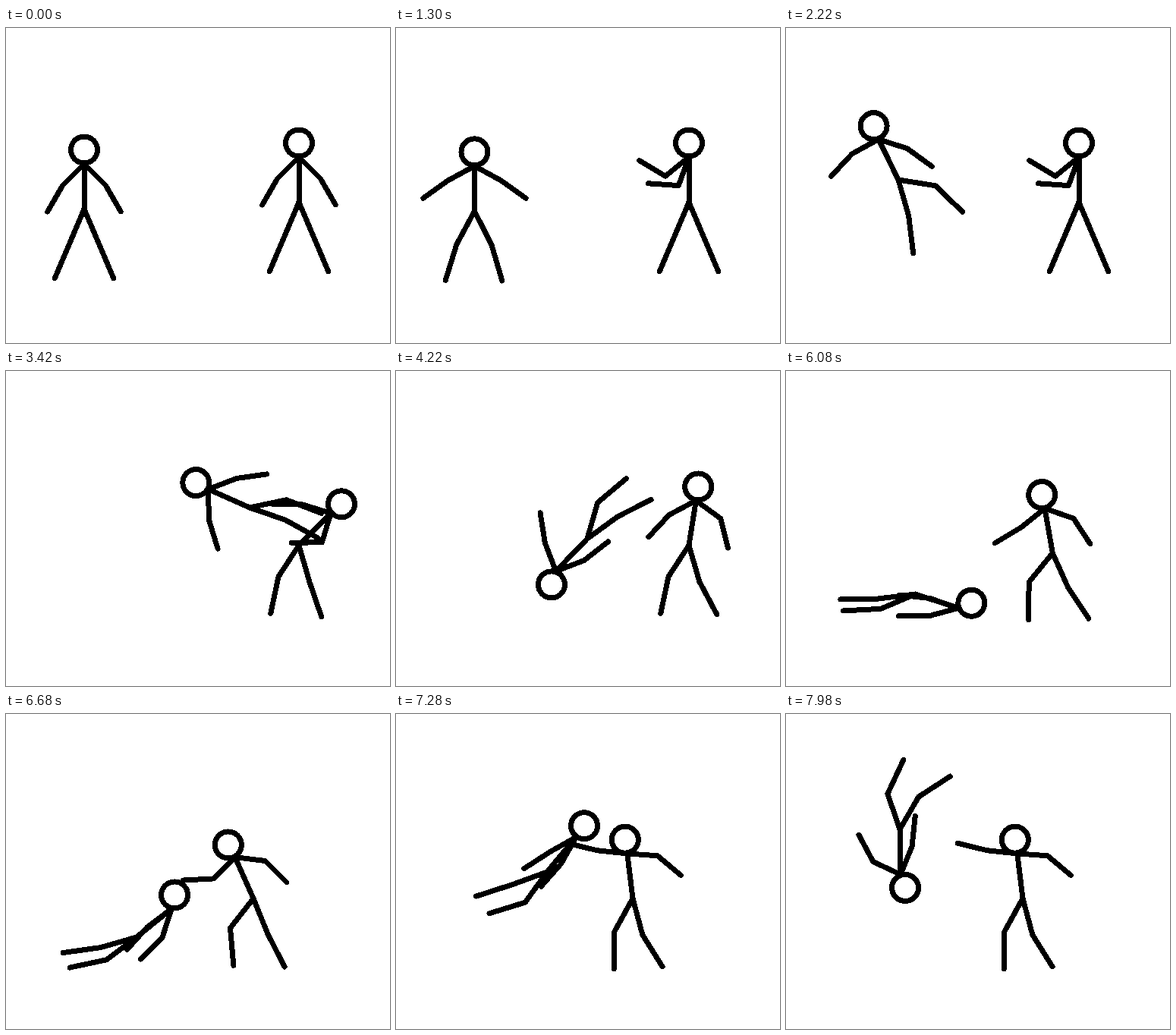
An HTML page that plays this animation: 506x415 px, repeating every 8 s.

```html
<!DOCTYPE html>
<html lang="en">
<head>
<meta charset="utf-8">
<title>Stick fight</title>
<style>
  html, body { margin: 0; width: 100%; height: 100%; overflow: hidden; background: #fff; }
  svg { display: block; width: 506px; height: 415px; }
  path { fill: none; stroke: #000; stroke-width: 7; stroke-linecap: round; stroke-linejoin: round; shape-rendering: crispEdges; }
</style>
</head>
<body>
<svg viewBox="0 0 506 415"><path id="attacker"/><path id="defender"/></svg>
<script>
const LOOP = 8000;
const TORSO = 59.5, NECK = 18.5, ARM = 40, LEG = 49.5, HEAD = 17.5;

// Angles are absolute degrees: 0 points right, 90 down. Spine is [torso, head], limbs are [upper, lower].
const stand = (x, y) => ({
  hip: [x, y], spine: [-90, -90],
  armA: [135, 120], armB: [45, 60],
  legA: [113, 113], legB: [67, 67]
});

// A move goes from wherever the figure is to the pose; bow bends the path of the hip on the way.
const attacker = {
  path: document.getElementById("attacker"),
  start: stand(103, 238.5),
  moves: [
    { // crouch with the arms spread
      from: 9, to: 18, hip: [104, 245], armA: [172, 175], armB: [8, 5], legA: [125, 100], legB: [58, 82]
    },
    { // leave the ground
      from: 18, to: 23, hip: [148, 200], spine: [-116, -110],
      armA: [151, 133], armB: [18, 36], legA: [74, 83], legB: [9, 44]
    },
    { // flying kick
      from: 23, to: 35, bow: [0, -17], hip: [321, 180], spine: [-156, -152],
      armA: [89, 73], armB: [-21, -8], legA: [19, 29], legB: [-12, 21]
    },
    { // tumble backwards
      from: 36, to: 43, hip: [252, 221], spine: [-226, -252],
      armA: [-21, -38], armB: [-111, -99], legA: [-36, -27], legB: [-74, -40]
    },
    { // roll flat
      from: 43, to: 54, bow: [0, -22], hip: [170.5, 294], spine: [-342, -381],
      armA: [-161, -174], armB: [-195, -180], legA: [-187, -181], legB: [-203, -183]
    },
    { // pulled up by the head
      from: 63, to: 69, hip: [172, 294], spine: [-399, -438],
      armA: [-217, -228], armB: [-252, -225], legA: [-196, -188], legB: [-217, -192]
    },
    { // held upright
      from: 69, to: 73, hip: [238, 224], spine: [-450, -450],
      armA: [-225, -240], armB: [-290, -270], legA: [-240, -245], legB: [-270, -235]
    },
    { // flipped over
      from: 73, to: 82, bow: [-30, 0], hip: [150, 152], spine: [-271, -289],
      armA: [-155, -118], armB: [-68, -84], legA: [-60, -33], legB: [-109, -65]
    }
  ]
};

const defender = {
  path: document.getElementById("defender"),
  start: stand(386, 229.5),
  moves: [
    { from: 0, to: 9, armA: [141, 211], armB: [110, 184] }, // guard
    { from: 23, to: 27, legA: [123, 102], legB: [74, 71] }, // brace
    { from: 31, to: 35, spine: [-45, -41], armA: [197, 181], armB: [107, 179] }, // recoil
    { from: 36, to: 43, spine: [-81, -81], armA: [152, 133], armB: [36, 76], legB: [74, 62] }, // recover
    { // step forward
      from: 54, to: 56, hip: [373, 237], spine: [-88, -87],
      armA: [147, 125], armB: [29, 67], legA: [130, 95], legB: [64, 51]
    },
    { // walk in and grab
      from: 56, to: 69, hip: [326, 243], spine: [-114, -119],
      armA: [135, 177], armB: [7, 45], legA: [128, 85], legB: [68, 63]
    },
    { // lift and throw
      from: 69, to: 73, hip: [312, 243], spine: [-97, -99],
      armA: [186, 194], armB: [4, 40], legA: [119, 91], legB: [75, 58]
    }
  ]
};

// Sections of 100 ms steps: [start time, first step]
const sections = [[0, 0], [1820, 19], [5460, 56], [6180, 64]];

function stepAt(time) {
  const [start, first] = sections.filter(([begin]) => time >= begin).pop();
  return first + Math.floor((time - start) / 100);
}

const mix = (a, b, k) => a.map((v, i) => v + (b[i] - v) * k);

function poseAt({ start, moves }, step) {
  const pose = { ...start };
  for (const { from, to, bow = [0, 0], ...goal } of moves) {
    if (step <= from) break;
    const k = Math.min(1, (step - from) / (to - from));
    for (const part in goal) pose[part] = mix(pose[part], goal[part], k);
    pose.hip = pose.hip.map((v, i) => v + bow[i] * Math.sin(Math.PI * k));
  }
  return pose;
}

function reach([x, y], angle, length) {
  const r = angle * Math.PI / 180;
  return [x + Math.cos(r) * length, y + Math.sin(r) * length];
}

const line = points => "M" + points.map(p => p.map(v => v.toFixed(2)).join()).join("L");

function limb(root, [upper, lower], length) {
  const joint = reach(root, upper, length);
  return line([root, joint, reach(joint, lower, length)]);
}

function circle([x, y], r) {
  const arc = `a${r},${r} 0 1 0 `;
  return `M${x - r},${y}${arc}${2 * r},0${arc}${-2 * r},0Z`;
}

function figurePath({ hip, spine, armA, armB, legA, legB }) {
  const neck = reach(hip, spine[0], TORSO);
  return line([hip, neck])
    + limb(neck, armA, ARM) + limb(neck, armB, ARM)
    + limb(hip, legA, LEG) + limb(hip, legB, LEG)
    + circle(reach(neck, spine[1], NECK), HEAD);
}

function draw(time) {
  const step = stepAt(time);
  for (const figure of [attacker, defender]) {
    figure.path.setAttribute("d", figurePath(poseAt(figure, step)));
  }
}

const origin = performance.now();
function tick() {
  draw((performance.now() - origin) % LOOP);
  requestAnimationFrame(tick);
}
tick();
</script>
</body>
</html>
```
